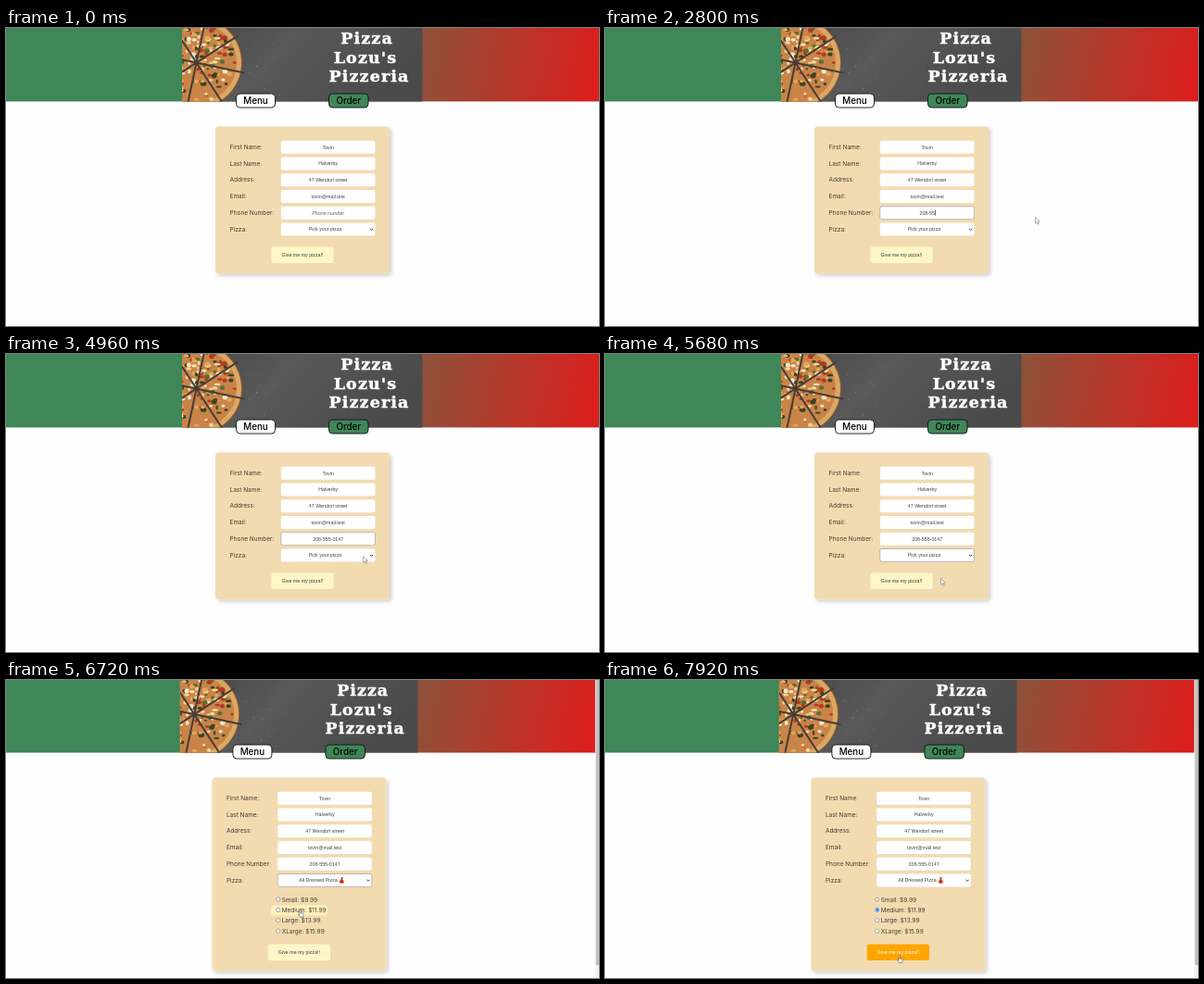
Recreate the animation shown at these times as an HTML page. Size 640 px wide and 322 px high, loop 8000 ms.

```html
<!DOCTYPE html>
<html lang="en">
<head>
<meta charset="utf-8">
<title>Pizza order form</title>
<style>
  html, body { margin: 0; width: 100%; height: 100%; overflow: hidden; background: #fefefe; }
  svg { display: block; width: 100vw; height: 100vh; }
  text { white-space: pre; }
  .ui { font-family: Inter, "Open Sans", sans-serif; font-size: 6.5px; fill: #443c30; }
  .nav { font-family: Inter, "Open Sans", sans-serif; font-size: 9.8px; font-weight: 500; text-anchor: middle; }
  .input { font-family: "Liberation Sans", Arial, sans-serif; font-size: 5.3px; fill: #444; }
  .mid { text-anchor: middle; }
  .sign {
    font-family: "DejaVu Serif", serif; font-size: 17.4px; font-weight: 700; letter-spacing: 1.2px;
    fill: #fff; stroke: #fff; stroke-width: .5; text-anchor: middle;
  }
</style>
</head>
<body>
<svg id="stage" viewBox="0 0 640 322" preserveAspectRatio="none">
  <defs>
    <linearGradient id="flag" gradientUnits="userSpaceOnUse" x1="250" y1="0" x2="630" y2="79">
      <stop offset="0" stop-color="#3f8658"/><stop offset="1" stop-color="#da1f1d"/>
    </linearGradient>
    <linearGradient id="slate" x2="1" y2=".3">
      <stop offset="0" stop-color="#464545"/><stop offset=".45" stop-color="#5a5959"/><stop offset="1" stop-color="#4b4a4b"/>
    </linearGradient>
    <clipPath id="photoClip"><rect x="190" width="259.4" height="79.4"/></clipPath>
    <filter id="shadow" x="-10%" y="-10%" width="120%" height="120%">
      <feDropShadow dx="2" dy="2" stdDeviation="2" flood-opacity=".2"/>
    </filter>
  </defs>
  <g id="banner">
    <rect x="-4" width="647" height="79.4" fill="url(#flag)"/>
    <g id="photo" clip-path="url(#photoClip)"><rect x="190" width="260" height="80" fill="url(#slate)"/></g>
    <text class="sign" x="389.5" y="17.2">Pizza</text>
    <text class="sign" x="388" y="38.2">Lozu's</text>
    <text class="sign" x="392" y="58.4">Pizzeria</text>
  </g>
  <g id="page"></g>
  <g id="scrollbar">
    <rect x="636" width="4" height="322" fill="#f1f1f1"/>
    <rect x="636.7" width="3.3" height="308" fill="#c1c1c1"/>
  </g>
  <g id="cursor" stroke="#777" stroke-width=".6" stroke-linejoin="round" fill="#fff">
    <path id="arrow" d="M0 0V6.7L1.6 5.3L2.7 7.8L3.8 7.3L2.7 4.9H4.8Z"/>
    <path id="beam" d="M-1.5 -3H-.4L0 -2.6L.4 -3H1.5M0 -2.6V2.6M-1.5 3H-.4L0 2.6L.4 3H1.5" fill="none" stroke="#222" stroke-width=".8"/>
    <path id="hand" stroke="#444" d="M0 .5Q.6 -.3 1.1 .5V3L3.6 3.5Q4.3 3.8 4.2 4.6L3.6 7.6H.6L-1.4 4.8Q-1.3 4 -.6 4.3L0 4.8Z"/>
  </g>
</svg>
<script>
const LOOP = 8000, STEP = 80;
const PHONE = "208-555-0147";
const KEY_TIMES = [1760, 2000, 2240, 2480, 2640, 2800, 2960, 3120, 3280, 3440, 3840, 4080];
const PHONE_FOCUS = 1120, SELECT_FOCUS = 5040, PIZZA_CHOSEN = 5920, SIZE_CHOSEN = 7040;
const PATH = [ // time, x, y
  [80, 414, 240], [480, 342.5, 200.5], [1120, 342.5, 200.5], [1440, 464.5, 204.5],
  [4240, 464.5, 204.5], [4320, 462.5, 205], [5040, 383, 219], [5200, 383, 219],
  [5680, 362.5, 242.5], [5920, 362.5, 242.5], [6640, 317, 248.7], [7120, 317, 248.7], [7680, 317, 298]
];
const FIELD = { x: 296.8, w: 101.6, h: 13.9, mid: 347.7 };
const FOCUS_WIDTH = .55;
const rowY = i => 128.7 + i * 17.75;
const optionY = i => 238.5 + i * 11.4;

const $ = id => document.getElementById(id);
const page = $("page");

function add(parent, tag, attrs, content) {
  const el = document.createElementNS("http://www.w3.org/2000/svg", tag);
  for (const key in attrs) el.setAttribute(key, attrs[key]);
  if (content !== undefined) el.textContent = content;
  return parent.appendChild(el);
}
const box = (parent, x, y, width, height, rx, fill, more) =>
  add(parent, "rect", { x, y, width, height, rx, fill, ...more });
const label = (parent, x, y, cls, content) => add(parent, "text", { x, y, class: cls }, content);
const show = (el, on) => el.setAttribute("display", on ? "inline" : "none");

function drawPizza() {
  let seed = 7;
  const rand = () => (seed = seed * 16807 % 2147483647) / 2147483647;
  const photo = $("photo"), cx = 205.5, cy = 37.5;
  const disc = (r, fill) => add(photo, "circle", { cx, cy, r, fill });
  disc(49.5, "#8f5a2c");
  disc(48.5, "#dba765");
  disc(43.5, "#c98448");
  const toppings = ["#b03a22", "#efd596", "#566f33", "#e2a65a", "#f3e6c2", "#3c4424"];
  for (let i = 0; i < 150; i++) {
    const a = rand() * 2 * Math.PI, d = Math.sqrt(rand()) * 43;
    add(photo, "ellipse", {
      cx: cx + d * Math.cos(a), cy: cy + d * Math.sin(a),
      rx: 1.2 + rand() * 2.2, ry: 1 + rand() * 1.6, fill: toppings[i % toppings.length]
    });
  }
  for (let i = 0; i < 8; i++) {
    const a = (i * 45 + 12) * Math.PI / 180;
    add(photo, "line", {
      x1: cx, y1: cy, x2: cx + 53 * Math.cos(a), y2: cy + 53 * Math.sin(a),
      stroke: "#453d39", "stroke-width": 2
    });
  }
  for (let i = 0; i < 24; i++) {
    add(photo, "circle", { cx: 258 + rand() * 45, cy: rand() * 79, r: .3 + rand() * .3, fill: "#8f8c88" });
  }
}

function navButton(x, w, fill, content) {
  box(page, x, 71, w, 15, 4, fill, { stroke: "#111", "stroke-width": .9 });
  label(page, x + w / 2, 82, "nav", content);
}

drawPizza();
navButton(248.5, 42, "#fff", "Menu");
navButton(348.5, 42.5, "#3f8658", "Order");
const card = box(page, 226, 106.6, 188, 159, 4, "#f3dbb1", { filter: "url(#shadow)" });

const rows = [["First Name:", "Tovin"], ["Last Name:", "Halverby"], ["Address:", "47 Wendorl street"],
  ["Email:", "tovin@mail.test"], ["Phone Number:", ""], ["Pizza:", "Pick your pizza"]];
const fields = rows.map(([name, value], i) => {
  const y = rowY(i);
  label(page, 241.5, y + 2.2, "ui", name);
  return {
    frame: box(page, FIELD.x, y - FIELD.h / 2, FIELD.w, FIELD.h, 2, "#fefefe", { stroke: "#8c8c8c", "stroke-width": 0 }),
    value: label(page, i === 5 ? 344.5 : FIELD.mid, y + 1.9, "input mid", value)
  };
});
const phone = fields[4], select = fields[5];
const caret = box(page, 0, rowY(4) - 3, .6, 6, 0, "#111");
add(page, "path", { d: "M393 216.8l1.6 1.6l1.6 -1.6", fill: "none", stroke: "#222", "stroke-width": .9 });

const dancer = add(page, "g", {});
add(dancer, "path", { d: "M365 216.5l1.4 -.8l1 1.6l1.2 3l-3.6 .4l-1.8 -1.2z", fill: "#c92c20" });
add(dancer, "path", { d: "M365.5 216.4l-1.8 1M366.6 216l1.6 -1.6M365.2 220.4l-.8 1", fill: "none", stroke: "#d99a3e", "stroke-width": .8 });
add(dancer, "circle", { cx: 366, cy: 215, r: .9, fill: "#6b3a20" });

const sizes = add(page, "g", {});
const options = ["Small: $9.99", "Medium: $11.99", "Large: $13.99", "XLarge: $15.99"].map((content, i) => {
  const y = optionY(i);
  const glow = box(sizes, 289.6, y - 5.6, 61, 11.2, 3, "#fcf0bd");
  const ring = add(sizes, "circle", { cx: 297.4, cy: y - .5, r: 2.1, fill: "#fff", stroke: "#767676", "stroke-width": .6 });
  const dot = add(sizes, "circle", { cx: 297.4, cy: y - .5, r: 1.3, fill: "#0075ff" });
  label(sizes, 301.3, y + 2.1, "ui", content);
  return { glow, ring, dot };
});

const submit = add(page, "g", {});
const submitBox = box(submit, 286.3, 236.4, 67.3, 17.5, 2, "#fdf7c8");
const submitText = label(submit, 320, 246.9, "input mid", "Give me my pizza!!");

function cursorAt(t) {
  let i = 0;
  while (i < PATH.length - 1 && PATH[i + 1][0] <= t) i++;
  const a = PATH[i], b = PATH[i + 1] || a;
  const p = b === a ? 0 : Math.max(0, (t - a[0]) / (b[0] - a[0]));
  const e = p * p * (3 - 2 * p);
  return [a[1] + (b[1] - a[1]) * e, a[2] + (b[2] - a[2]) * e];
}

const mix = (a, b, p) => `rgb(${a.map((v, i) => Math.round(v + (b[i] - v) * p))})`;

function updatePhone(t) {
  const typed = KEY_TIMES.filter(k => k <= t).length;
  const focused = t >= PHONE_FOCUS && t < SELECT_FOCUS;
  phone.value.textContent = typed ? PHONE.slice(0, typed) : "Phone number";
  phone.value.setAttribute("style", typed ? "" : "font-style: italic; fill: #666");
  phone.frame.setAttribute("stroke-width", focused ? FOCUS_WIDTH : 0);
  const half = typed ? phone.value.getComputedTextLength() / 2 : 0;
  caret.setAttribute("x", FIELD.mid + half);
  const since = t - (typed ? KEY_TIMES[typed - 1] : PHONE_FOCUS);
  show(caret, focused && Math.floor(since / 480) % 2 === 0);
}

function render(t) {
  const open = t >= PIZZA_CHOSEN, chosen = t >= SIZE_CHOSEN;
  const dx = open ? -3.6 : 0, dy = open ? -1 : 0, drop = open ? 50 : 0;
  $("banner").setAttribute("transform", open ? "translate(-4) scale(.989) translate(4)" : "");
  page.setAttribute("transform", `translate(${dx} ${dy})`);
  card.setAttribute("height", 159 + drop);
  submit.setAttribute("transform", `translate(0 ${drop})`);
  [$("scrollbar"), sizes, dancer].forEach(el => show(el, open));

  updatePhone(t);
  select.value.textContent = open ? "All Dressed Pizza" : "Pick your pizza";
  select.value.setAttribute("x", open ? 340.5 : 344.5);
  select.frame.setAttribute("stroke-width", t >= SELECT_FOCUS && !chosen ? FOCUS_WIDTH : 0);

  const [x, y] = cursorAt(t), px = x - dx, py = y - dy;
  let hovering = false;
  options.forEach((option, i) => {
    const over = open && px > 289.6 && px < 350.6 && Math.abs(py - optionY(i)) < 5.6;
    hovering = hovering || over;
    show(option.glow, over);
    const checked = chosen && i === 1;
    show(option.dot, checked);
    option.ring.setAttribute("stroke", checked ? "#0075ff" : "#767676");
  });
  const overSubmit = px > 286 && px < 354 && py > 236.5 + drop && py < 254 + drop;
  const heat = overSubmit ? Math.min(1, Math.max(0, (t - 7440) / 320)) : 0;
  submitBox.setAttribute("fill", mix([253, 247, 200], [255, 165, 0], heat));
  submitText.setAttribute("style", `fill: ${mix([60, 60, 60], [255, 255, 255], heat)}`);

  const overInput = px > FIELD.x && px < FIELD.x + FIELD.w &&
    rows.some((_, i) => i < 5 && Math.abs(py - rowY(i)) < FIELD.h / 2);
  const shape = hovering || overSubmit ? "hand" : overInput ? "beam" : "arrow";
  for (const id of ["arrow", "beam", "hand"]) show($(id), id === shape);
  show($("cursor"), t >= PATH[0][0]);
  $("cursor").setAttribute("transform", `translate(${x} ${y})`);
}

const start = performance.now();
function tick() {
  const t = (performance.now() - start) % LOOP;
  render(Math.floor(t / STEP) * STEP);
  requestAnimationFrame(tick);
}
tick();
</script>
</body>
</html>
```
